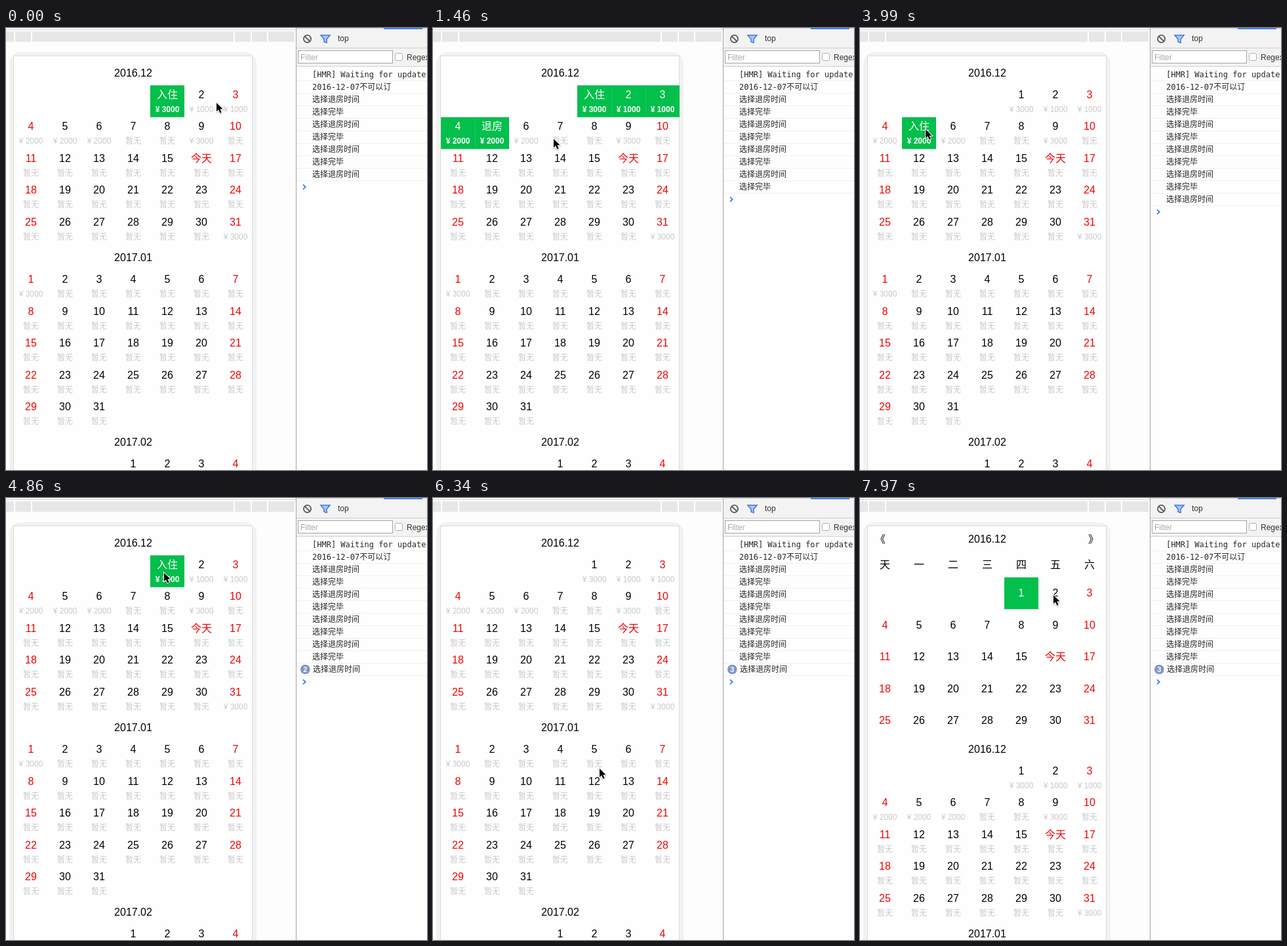
These frames come from a looping animation (642 by 673 pixels, 8 s). An HTML page with a canvas:

```html
<!DOCTYPE html>
<html lang="zh">
<head>
<meta charset="utf-8">
<title>Calendar</title>
<style>
  html, body { margin: 0; width: 100%; height: 100%; overflow: hidden; background: #fdfdfd; }
  canvas { display: block; }
</style>
</head>
<body>
<canvas id="stage" width="642" height="673"></canvas>
<script>
const ctx = document.getElementById('stage').getContext('2d');
const LOOP = 8000, TICK = 147.5, FIRST = 132;
const SANS = '"Liberation Sans", "Noto Sans CJK SC", "Noto Sans CJK", sans-serif';
const MONO = '"DejaVu Sans Mono", "Noto Sans CJK SC", "Noto Sans CJK", monospace';
const GREEN = '#03bf4c', RED = '#f40000', BLACK = '#000', GREY = '#c9c9c9';
const COL = 52, ROW = 48.5, MONTH = 281.25, SCROLL = 314;
const CHECK_IN = '选择退房时间', DONE = '选择完毕';

// Clicks on the price calendar, in ticks
const CLICKS = [
  { tick: 5, day: 5 }, { tick: 25, day: 5 }, { tick: 30, day: 1 }, { tick: 35, day: 1 }
];
const PICKER_CLICK = 50;

// Pointer moves: start tick, end tick, destination; it rests in between
const START = [321, 114];
const MOVES = [
  [-1, 4, 92, 167], [5, 9, 184, 169], [9, 11, 196, 162], [12, 15, 136, 159],
  [20, 22, 92, 157], [25, 32, 241, 114], [34, 40, 264, 457],
  [40, 44, 244, 367], [44, 49, 240, 150], [50, 53, 295, 148]
];

function ease(from, to, k) {
  const f = Math.min(1, Math.max(0, (k - from) / (to - from)));
  return f * f * (3 - 2 * f);
}

function pointer(k) {
  return MOVES.reduce(([x, y], [from, to, toX, toY]) => {
    const f = ease(from, to, k);
    return [x + (toX - x) * f, y + (toY - y) * f];
  }, START);
}

// Replays the clicks: the chosen range and the console output
function booking(k) {
  const rows = ['[HMR] Waiting for update', '2016-12-07不可以订'].map(s => ({ s, count: 1 }));
  const log = s => {
    const last = rows[rows.length - 1];
    if (last.s === s) last.count++;
    else rows.push({ s, count: 1 });
  };
  for (let i = 0; i < 7; i++) log(i % 2 ? DONE : CHECK_IN);
  let range = [1, 1];
  for (const { tick, day } of CLICKS) {
    if (tick > k) break;
    const [first, last] = range;
    const completes = first === last && day > first;
    if (completes) range = [first, day];
    else range = first === last && day === first ? null : [day, day];
    log(completes ? DONE : CHECK_IN);
  }
  return { rows, range };
}

function box(x, y, w, h, color) {
  ctx.fillStyle = color;
  ctx.fillRect(x, y, w, h);
}

function text(s, x, y, size, color, { align = 'center', family = SANS, weight = 400 } = {}) {
  ctx.font = `${weight} ${size}px ${family}`;
  ctx.textAlign = align;
  ctx.fillStyle = color;
  ctx.fillText(s, x, y + size * 0.36);
}

function trace(points) {
  ctx.beginPath();
  points.forEach(([x, y]) => ctx.lineTo(x, y));
}

function disc(x, y, r) {
  ctx.beginPath();
  ctx.arc(x, y, r, 0, 2 * Math.PI);
}

function fill(color) {
  ctx.fillStyle = color;
  ctx.fill();
}

function stroke(color, width) {
  ctx.strokeStyle = color;
  ctx.lineWidth = width;
  ctx.stroke();
}

function price(month, day) {
  if (day === 1 && month < 2) return 3000;
  if (month !== 12) return 0;
  if (day <= 6) return day === 1 ? 3000 : day < 4 ? 1000 : 2000;
  return day === 9 || day === 31 ? 3000 : 0;
}

// Calls draw with day, name, colour and position for each day of a month
function eachDay(month, firstCol, count, top, draw) {
  for (let day = 1; day <= count; day++) {
    const cell = firstCol + day - 1, col = cell % 7;
    const today = month === 12 && day === 16;
    draw({
      day,
      name: today ? '今天' : String(day),
      color: today || col % 6 === 0 ? RED : BLACK,
      x: 38 + COL * col,
      y: top + ROW * Math.floor(cell / 7)
    });
  }
}

function priceMonth(title, month, firstCol, count, top, range) {
  text(title, 194, top, 16, BLACK);
  eachDay(month, firstCol, count, top + 33, ({ day, name, color, x, y }) => {
    const on = range && day >= range[0] && day <= range[1];
    if (on) {
      box(x - 26, y - 13.7, COL, ROW, GREEN);
      if (day > range[0]) box(x - 26, y - 13.7, 1, ROW, '#1cc55f');
      name = day === range[0] ? '入住' : day === range[1] ? '退房' : name;
    }
    const cost = price(month, day);
    text(name, x, y, 16, on ? '#fff' : color, { weight: on ? 500 : 400 });
    text(cost ? '¥ ' + cost : '暂无', x, y + 22.5, 12, on ? '#fff' : GREY, { weight: on ? 700 : 400 });
  });
}

function pickerMonth(top, selected) {
  text('《', 23, top, 16, BLACK, { align: 'left' });
  text('2016.12', 194, top, 16, BLACK);
  text('》', 348, top, 16, BLACK, { align: 'left' });
  [...'天一二三四五六'].forEach((s, i) => text(s, 38 + COL * i, top + 39.5, 16, BLACK));
  eachDay(12, 4, 31, top + 82.5, ({ day, name, color, x, y }) => {
    const on = day === selected;
    if (on) box(x - 26, y - 23.7, COL, ROW, GREEN);
    text(name, x, y, 16, on ? '#fff' : color, { weight: on ? 500 : 400 });
  });
}

function phone(k, range) {
  box(0, 0, 442, 673, '#fdfdfd');
  box(0, 2, 442, 1, '#d2d2d2');
  box(0, 5, 440, 16, '#e7e7e7');
  [12, 38, 347, 373, 398].forEach(x => box(x, 5, 2, 16, '#fff'));

  ctx.beginPath();
  ctx.roundRect(5, 37, 377, 660, 17);
  fill('#f2f2f2');
  box(11, 42, 365, 640, '#dcdcdc');
  box(12, 43, 363, 640, '#fefefe');

  ctx.save();
  ctx.beginPath();
  ctx.rect(12, 43, 364, 630);
  ctx.clip();
  const shift = SCROLL * ease(42, 44, k), top = 68 + shift;
  if (shift) pickerMonth(top - 320, k < PICKER_CLICK ? 14 : 1);
  priceMonth('2016.12', 12, 4, 31, top, range);
  priceMonth('2017.01', 1, 0, 31, top + MONTH);
  priceMonth('2017.02', 2, 3, 28, top + 2 * MONTH);
  ctx.restore();
}

function toolbar() {
  box(443, 0, 199, 58, '#f3f3f3');
  box(443, 0, 199, 1, '#d5d5d5');
  box(576, 0, 59, 2, '#4583ec');
  box(443, 30, 199, 1, '#cfcfcf');
  box(443, 58, 199, 1, '#d4d4d4');

  disc(459.5, 16.5, 5.6);
  stroke('#5a5a5a', 1.8);
  trace([[455.5, 12.5], [463.5, 20.5]]);
  stroke('#5a5a5a', 1.8);

  trace([[480, 11], [494, 11], [489, 17], [489, 22.5], [485, 21], [485, 17]]);
  ctx.closePath();
  fill('#a9c5f6');
  stroke('#4079dc', 1.5);
  text('top', 506, 16, 12, '#333', { align: 'left' });

  box(445, 34, 145, 20, '#a6a6a6');
  box(446, 35, 143, 18, '#fff');
  text('Filter', 449, 44.5, 12, '#a9a9a9', { align: 'left' });
  ctx.beginPath();
  ctx.roundRect(593.5, 38.5, 11, 11, 2);
  fill('#fff');
  stroke('#b0b0b0', 1);
  text('Regex', 611, 44.5, 12, '#333', { align: 'left' });
}

function consolePanel(rows) {
  box(442, 0, 1, 673, '#a3a3a3');
  box(443, 0, 199, 673, '#fefefe');
  toolbar();

  let y = 71;
  for (const { s, count } of rows) {
    const repeated = count > 1;
    text(s, repeated ? 468 : 467, y, 12, '#262626', { align: 'left', family: MONO });
    box(443, y + 9, 199, 1, '#f0f0f0');
    if (repeated) {
      disc(456.3, y, 7.3);
      fill('#7d98c5');
      text(String(count), 456.3, y, 11, '#fff', { weight: 700 });
    }
    y += 19;
  }
  trace([[453, y - 3.5], [456.8, y], [453, y + 3.5]]);
  stroke('#3c7df0', 1.7);
}

function arrow(x, y) {
  ctx.save();
  ctx.translate(x, y);
  ctx.scale(0.93, 0.93);
  trace([[0, 0], [0, 14], [3.3, 11], [5.8, 16.6], [8.2, 15.5], [5.8, 10.2], [10.2, 10]]);
  ctx.closePath();
  ctx.shadowColor = 'rgba(0,0,0,.3)';
  ctx.shadowBlur = 2;
  ctx.shadowOffsetY = 1;
  stroke('#fff', 2);
  ctx.shadowColor = 'transparent';
  fill(BLACK);
  ctx.restore();
}

function frame() {
  const t = performance.now() % LOOP;
  const k = Math.max(-1, Math.floor((t - FIRST) / TICK));
  const { rows, range } = booking(k);
  phone(k, range);
  consolePanel(rows);
  arrow(...pointer(k));
  requestAnimationFrame(frame);
}
frame();
</script>
</body>
</html>
```
